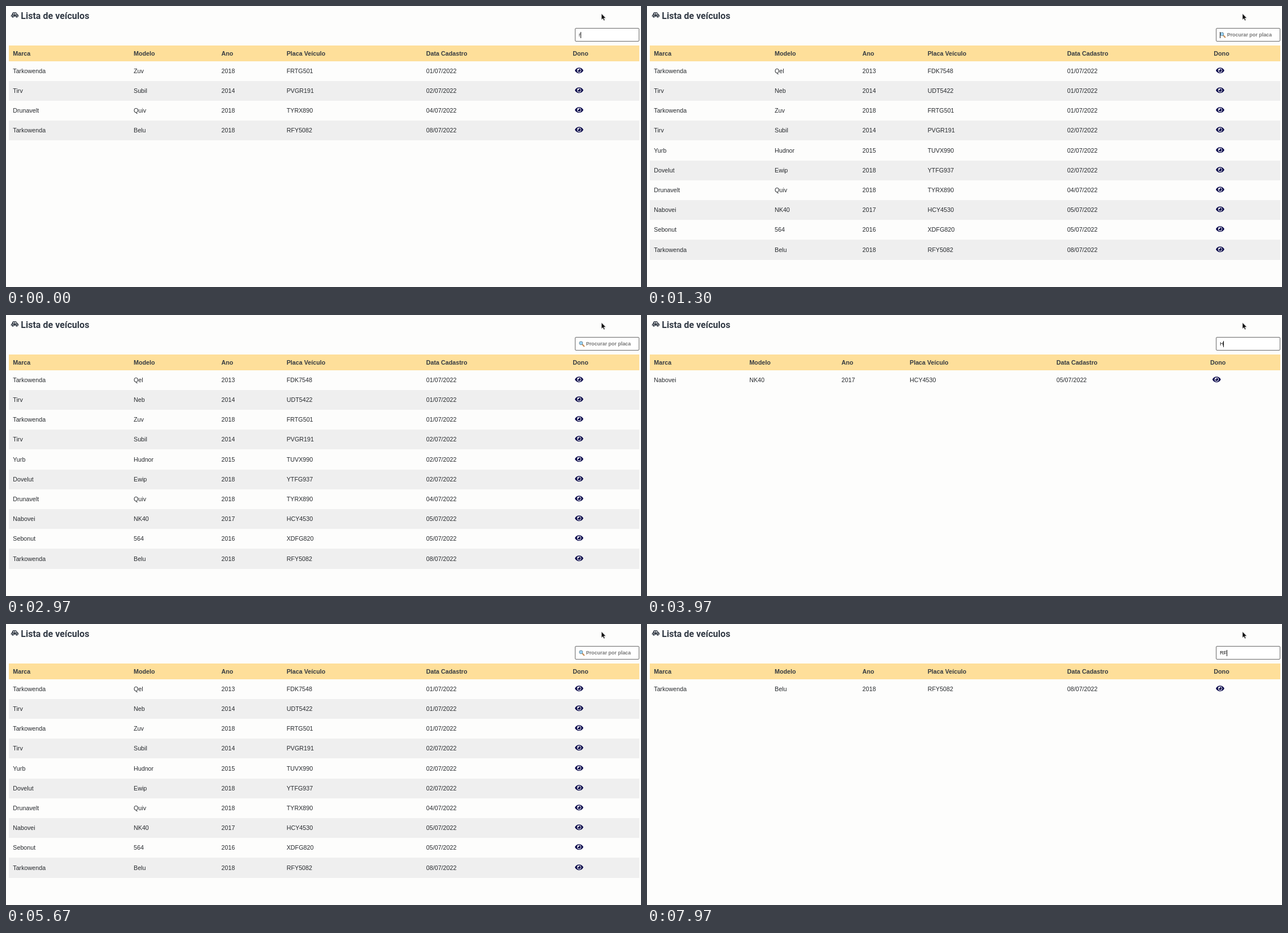
Recreate the animation shown at these times as an HTML page. Size 1124 px wide and 498 px high, loop 8000 ms.

```html
<!DOCTYPE html>
<html lang="pt-BR">
<head>
<meta charset="utf-8">
<title>Lista de veículos</title>
<style>
html, body { margin: 0; width: 100%; height: 100%; overflow: hidden; background: #fdfdfc }
svg { display: block }
text { font: 10.72px "Liberation Sans", Arial, sans-serif; fill: #26292d; white-space: pre }
.title { font: bold 16.08px Roboto, sans-serif; fill: #323a45 }
.head text { font-weight: bold; fill: #343a40 }
.small { font-size: 8.93px; fill: #111 }
.hint { font-weight: bold; fill: #777 }
</style>
</head>
<body>
<svg width="1124" height="498" viewBox="0 0 1124 498">
  <g fill="#323a45">
    <path fill-rule="evenodd" d="M8.8 19v-2.1q0-1.3 1.4-1.5l1.2-3q.4-1.1 1.6-1.1h4q.9 0 1.5.7l2.2 3.1q1.6.3 1.6 1.9V19zM12.5 15.1h2.3v-2.3h-1.4zM16 15.1h3l-1.6-2.1q-.2-.2-.5-.2H16z"/>
    <g stroke="#fdfdfc" stroke-width=".7"><circle cx="12" cy="18.9" r="2.1"/><circle cx="19" cy="18.9" r="2.1"/></g>
  </g>
  <text class="title" x="26.2" y="23">Lista de veículos</text>
  <rect x="1007.5" y="39.5" width="113" height="23" rx="1.5" fill="#fff" stroke="#686868"/>
  <g id="placeholder">
    <path d="M1020.3 52.3l3 3.2" stroke="#c58a50" stroke-width="2" stroke-linecap="round"/>
    <circle cx="1017.8" cy="49.8" r="3" fill="#9bd3f5" stroke="#6b8796"/>
    <text class="small hint" x="1026.7" y="54.4">Procurar por placa</text>
  </g>
  <text id="query" class="small" x="1014" y="54.4"></text>
  <rect id="caret" y="46" width="1" height="11" fill="#111"/>
  <rect x="5" y="70" width="1116" height="28" fill="#fedf9a"/>
  <g id="table"></g>
  <path d="M1054 13.5v11l2.5-2.3 1.7 3.8 1.9-.8-1.7-3.7h3.4z" fill="#111" stroke="#fff" stroke-width=".6"/>
</svg>
<script>
const LOOP = 8000;
const headers = ['Marca', 'Modelo', 'Ano', 'Placa Veículo', 'Data Cadastro', 'Dono'];
const vehicles = `Tarkowenda,Qel,2013,FDK7548,01
Tirv,Neb,2014,UDT5422,01
Tarkowenda,Zuv,2018,FRTG501,01
Tirv,Subil,2014,PVGR191,02
Yurb,Hudnor,2015,TUVX990,02
Dovelut,Ewip,2018,YTFG937,02
Drunavelt,Quiv,2018,TYRX890,04
Nabovei,NK40,2017,HCY4530,05
Sebonut,564,2016,XDFG820,05
Tarkowenda,Belu,2018,RFY5082,08`.split('\n').map(line => (line + '/07/2022').split(','));

const wideColumns = [12.3, 226, 381.3, 496.7, 743.8, 1003.3];
const narrowColumns = [12.3, 181.2, 344.3, 465, 724.7, 997];

// [start in ms, typed text, caret visible]
const timeline = [
  [0, 'r', 1], [530, 'r', 0], [870, '', 0], [1070, '', 1], [1570, '', 0],
  [2070, '', 1], [2570, '', 0], [3100, '', 1], [3570, '', 0],
  [3900, 'H', 1], [4200, 'HC', 1], [4560, 'HCY', 1], [5230, 'HC', 1], [5500, 'H', 1],
  [5670, '', 0], [5870, '', 1], [6370, '', 0],
  [6770, 'R', 1], [7400, 'R', 0], [7930, 'RF', 1]
];

const byId = id => document.getElementById(id);
const cells = (values, columns, y) =>
  values.map((value, i) => `<text x="${columns[i]}" y="${y}">${value}</text>`).join('');

const eye = (x, y, background) => `<g transform="translate(${x} ${y})" fill="#07064a">
  <path d="M-7.5 0C-4.4-6.6 4.4-6.6 7.5 0C4.4 6.6-4.4 6.6-7.5 0"/>
  <circle r="3.7" fill="${background}"/><circle r="2.6"/>
  <circle cx="-1.2" cy="-1.2" r="1.2" fill="${background}"/></g>`;

function row(vehicle, i, columns) {
  const top = Math.round(97.6 + 35.2 * i), bottom = Math.round(132.8 + 35.2 * i);
  const middle = Math.round(114.8 + 35.2 * i);
  const background = i % 2 ? '#efefef' : '#fdfdfc';
  return `<rect x="5" y="${top}" width="1116" height="${bottom - top}" fill="${background}"/>`
    + cells(vehicle, columns, middle + 4) + eye(columns[5] + 11.2, middle - .8, background);
}

function show(typed, caretOn) {
  const found = vehicles.filter(v => v[3].includes(typed.toUpperCase()));
  const columns = typed[0] === 'H' ? narrowColumns : wideColumns;
  byId('table').innerHTML = `<g class="head">${cells(headers, columns, 87.7)}</g>`
    + found.map((v, i) => row(v, i, columns)).join('');
  byId('query').textContent = typed;
  byId('placeholder').style.display = typed ? 'none' : '';
  const textWidth = typed ? byId('query').getComputedTextLength() : 0;
  byId('caret').setAttribute('x', Math.round(1013.8 + textWidth));
  byId('caret').style.display = caretOn ? '' : 'none';
}

let current;
function tick() {
  const time = performance.now() % LOOP;
  const state = timeline.findLast(([start]) => start <= time);
  if (state !== current) show(state[1], state[2]);
  current = state;
  requestAnimationFrame(tick);
}
tick();
</script>
</body>
</html>
```
